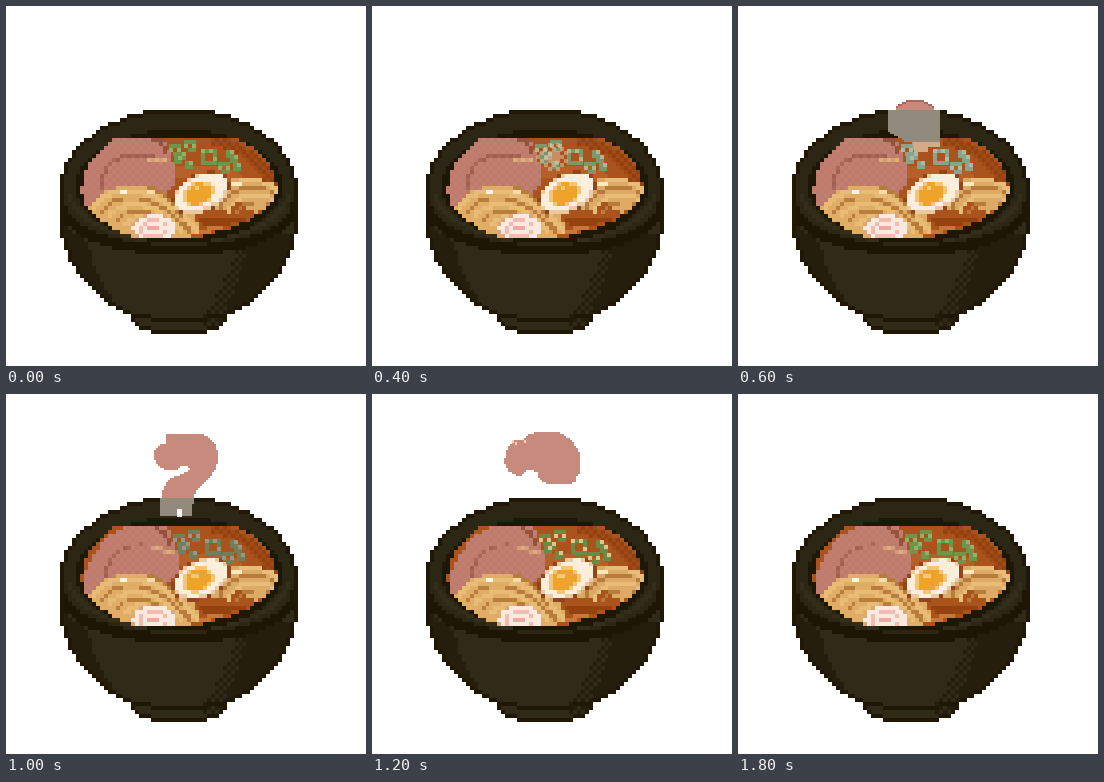
Animation, 360 px wide and 360 px high, one loop 2 s. Source, as an HTML page with a canvas:

```html
<!DOCTYPE html>
<html lang="en">
<head>
<meta charset="utf-8">
<title>Ramen</title>
<style>
html, body { margin: 0; width: 100%; height: 100%; overflow: hidden; background: #fff; }
canvas { display: block; width: 360px; height: 360px; }
</style>
</head>
<body>
<canvas id="stage" width="360" height="360"></canvas>
<script>
const stage = document.getElementById('stage');
const ctx = stage.getContext('2d');
const COLS = 60, ROWS = 56, LEFT = 54, TOP = 104;
const CW = 238 / COLS, CH = 4;
const STEP = 200, STEPS = 10;

const shape = d => new Path2D(d);
function oval(x, y, rx, ry, turn = 0) {
  const p = new Path2D();
  p.ellipse(x, y, rx, ry, turn, 0, Math.PI * 2);
  return p;
}

const bowl = shape('M147 105H199C244 109 291 143 291 180V222C287 258 262 292 222 309L219 317Q211 327 190 327H156Q135 327 127 317L124 309C84 292 58 258 54 222V180C54 143 102 109 147 105Z');
const wall = oval(173, 180, 103, 57);
const broth = shape('M110 132H229Q270 150 271 184Q266 214 191 231H127Q77 212 75 184Q80 148 110 132Z');
const rimEdge = shape('M54 198C62 229 112 244 173 244S284 229 291 198');
const rimLight = shape('M63 188C70 218 120 236 173 236S276 218 283 188');
const rim = shape('M54 104H291V196C284 228 233 244 173 244S62 228 54 196Z');
const shade = shape('M242 230H300V327H205Q236 282 242 230ZM50 215L82 236Q86 265 108 296L100 310H50Z');
const shadeSoft = shape('M232 236H250L220 318H192Q220 280 232 236Z');
const foot = shape('M123 307Q173 322 223 307');

// Each layer: path, tone, checker tone, stroke width, shift for the second pose.
const layers = [];
const add = (p, c, alt = c, w = 0, shift = [0, 0]) => layers.push({ p, c, alt, w, shift });

add(broth, '#ab531c');
add(shape('M205 128Q258 140 275 180L258 174Q246 148 205 139Z'), '#93420f', '#a04a17');
add(shape('M166 160H216L240 169L226 176L164 172Z'), '#b65f28');
add(shape('M194 212H246L226 218H196Z'), '#94430f');
add(shape('M192 226L216 221'), '#c8763a', undefined, 5);

const slip = [4, 3];
add(shape('M66 200L78 168Q92 137 120 128H154Q163 138 165 151Q173 164 170 176L158 188H120L98 199Z'), '#be7b6c', '#c17f71', 0, slip);
add(shape('M96 186Q97 158 119 151Q143 145 163 155Q171 166 169 175L158 186L119 187Z'), '#c28072', '#bd7969', 0, slip);
add(shape('M94 188Q94 161 113 152Q130 145 152 152'), '#a0604f', '#a86858', 3, slip);
add(shape('M142 153L152 152L163 157'), '#dfad78', '#d39d77', 4, slip);
add(shape('M145 131L155 136L160 147'), '#97513c', undefined, 4, slip);

// Noodle bundles
add(shape('M203 205Q207 174 233 172Q255 171 272 183L267 202L248 207L232 196L214 206Z'), '#dcaa64');
for (let k = 0; k < 4; k++) {
  const d = `M${204 + k * 9} ${204 + k}Q${211 + k * 8} ${177 + k * 7} ${238 + k * 4} ${175 + k * 7}T272 ${187 + k * 6}`;
  add(shape(d), k % 2 ? '#b77c3b' : '#e8bd79', undefined, k % 2 ? 3 : 4);
}
add(shape('M226 177H237'), '#fbe9c2', undefined, 4);

add(shape('M82 203Q94 181 119 181Q151 178 169 195Q188 205 194 222L183 234H118Z'), '#dfad66');
for (let k = 0; k < 5; k++) {
  const d = `M${86 + k * 8} ${204 + k * 4}C${99 + k * 7} ${178 + k * 8} ${149 - k} ${173 + k * 8} ${191 - k * 7} ${226 + k}`;
  add(shape(d), k % 2 ? '#b97e3d' : '#e8bc76', undefined, k % 2 ? 3 : 5);
}
add(shape('M143 182Q164 188 172 205L184 227'), '#b77b3a', undefined, 3);
add(shape('M113 185H123'), '#fff5dd', undefined, 4);
add(shape('M140 186H149'), '#f5dcac', undefined, 4);

const tilt = -0.45, lift = [0, -2];
add(oval(195, 187, 30, 19, tilt), '#92441a', undefined, 0, lift);
add(oval(195, 187, 29, 18, tilt), '#ecc9a0', undefined, 0, lift);
add(oval(195, 186, 27, 16, tilt), '#fbeedb', undefined, 0, lift);
add(oval(192, 188, 16, 12, tilt), '#f3c579', undefined, 0, lift);
add(oval(192, 188, 13, 10, tilt), '#eea32b', undefined, 0, lift);
add(shape('M185 185L194 181'), '#f8c86c', undefined, 3, lift);

const bob = [0, 3];
add(oval(148, 222, 23, 14), '#d9a67f', undefined, 0, bob);
add(oval(148, 222, 21, 13), '#fae9de', undefined, 0, bob);
add(oval(148, 223, 13, 8), '#f2bcb2', undefined, 3, bob);
add(shape('M143 223H152'), '#eca9a1', undefined, 3, bob);
layers.reverse();

const inside = (p, x, y) => ctx.isPointInPath(p, x, y);
function onLine(p, w, x, y) {
  ctx.lineWidth = w;
  return ctx.isPointInStroke(p, x, y);
}

function tone(x, y, odd, pose) {
  if (inside(broth, x, y)) {
    for (const { p, c, alt, w, shift } of layers) {
      const u = x - shift[0] * pose, v = y - shift[1] * pose;
      if (w ? onLine(p, w, u, v) : inside(p, u, v)) return odd ? alt : c;
    }
  }
  const edge = [[CW, 0], [-CW, 0], [0, CH], [0, -CH]].some(([a, b]) => !inside(bowl, x + a, y + b));
  if (edge) return '#211705';
  if (inside(wall, x, y)) return '#1d1706';
  if (onLine(rimEdge, 10, x, y)) return '#1d1605';
  if (onLine(rimLight, 4, x, y)) return '#332d1b';
  if (inside(rim, x, y)) return '#2c2614';
  if (onLine(foot, 4, x, y)) return '#1f1706';
  if (inside(shade, x, y)) return '#251e0d';
  if (inside(shadeSoft, x, y)) return odd ? '#251e0d' : '#302a18';
  return '#302a18';
}

function scene(pose) {
  const c = document.createElement('canvas');
  c.width = c.height = 360;
  const g = c.getContext('2d');
  for (let r = 0; r < ROWS; r++) for (let i = 0; i < COLS; i++) {
    const x = LEFT + (i + .5) * CW, y = TOP + (r + .5) * CH;
    if (!inside(bowl, x, y)) continue;
    const x0 = Math.round(LEFT + i * CW), x1 = Math.round(LEFT + (i + 1) * CW);
    g.fillStyle = tone(x, y, (i + r) & 1, pose);
    g.fillRect(x0, TOP + r * CH, x1 - x0, CH);
  }
  return c;
}
const poses = [scene(0), scene(1)];

// Spring onion: x, y and size in cells
const onions = [[163, 138, 3], [178, 134, 3], [172, 146, 2], [168, 150, 2], [179, 155, 2], [195, 143, 4], [220, 144, 2], [224, 149, 2], [212, 156, 3], [227, 157, 2]];
function drawOnions(pose, [main, light]) {
  for (const [x, y, n] of onions) for (let r = 0; r < n; r++) for (let c = 0; c < n; c++) {
    const hole = n > 2 && r > 0 && c > 0 && r < n - 1 && c < n - 1;
    if (hole || (n === 3 && r === 2 && c === 0)) continue;
    ctx.fillStyle = (r + c * 2 + n) % 4 ? main : light;
    ctx.fillRect(x + c * 4 + pose * 4, y + r * 4 + pose * 2, 4, 4);
  }
}

const GREEN = ['#6f954b', '#8fb16a'];
const PINK = '#c88a7d', GREY = '#938a7e';
const puffs = {
  3: {
    d: 'M151 104H157Q160 96 172 94H181Q193 96 197 104H202V136H168L160 131L151 126Z',
    low: 'M174 136H202V141H190V146H176Z', rimmed: true
  },
  4: {
    d: 'M151 104Q151 95 158 88Q164 80 162 70L158 66L159 58L168 55L172 51Q181 49 188 54H194Q209 59 209 72V88Q208 95 194 102Q186 108 189 118L193 131H171Q163 129 161 119L151 113Z',
    low: 'M170 131H191V137H188V145H176V138H170Z'
  },
  5: {
    d: 'M160 40H196Q211 46 212 61Q212 76 201 86Q190 95 188 104V110H185V122H155V105Q157 92 165 84Q179 80 184 75Q180 70 174 73Q170 78 158 75Q147 69 148 59Q151 51 160 49Z',
    low: 'M171 115H176V123H171Z', spot: '#f8f6f2'
  },
  6: {
    d: 'M133 64Q135 50 143 46L150 47L157 41Q166 37 178 37Q191 38 198 46Q207 54 209 66Q209 75 207 80L203 83V88L198 90H180Q167 89 166 80Q162 75 154 77L148 82Q135 80 133 70Z'
  }
};
for (const p of Object.values(puffs)) {
  p.path = shape(p.d);
  p.lowPath = p.low && shape(p.low);
}

function drawSteam(n) {
  if (n === 2) {
    ctx.fillStyle = 'rgba(226,190,160,.55)';
    for (let y = 137; y < 163; y += 4) for (let x = 160; x < 196; x += 4) {
      const d = Math.hypot((x - 179) / 17, (y - 149) / 13);
      if (d < 1 && (d < .5 || (x + y) % 8 < 4)) ctx.fillRect(x, y, 4, 4);
    }
    return;
  }
  const puff = puffs[n];
  if (!puff) return;
  for (let y = 36; y < 138; y += 2) for (let x = 130; x < 216; x += 2) {
    if (!inside(puff.path, x + 1, y + 1)) continue;
    const brink = puff.rimmed && y < 104 && !inside(puff.path, x + 1, y - 1);
    ctx.fillStyle = brink ? '#ad6757' : y < 104 ? PINK : GREY;
    ctx.fillRect(x, y, 2, 2);
  }
  if (puff.lowPath) {
    ctx.fillStyle = puff.spot || '#d6a988';
    ctx.fill(puff.lowPath);
  }
  if (n === 6) {
    ctx.fillStyle = '#f0d8b0';
    for (const [x, y] of [[140, 46], [143, 48], [152, 46]]) ctx.fillRect(x, y, 2, 3);
  }
}

const tints = {
  2: ['#7c986a', '#adb892'],
  3: ['#8aa38c', '#a5bcab'],
  4: ['#7d9d68', '#9cb689'],
  5: ['#727f58', '#989687'],
  6: ['#6a8a45', '#e0c58b']
};

let last = -1;
function draw(now) {
  const n = Math.floor(now / STEP) % STEPS;
  if (n === last) return;
  last = n;
  const pose = n < 5 ? 0 : 1;
  ctx.fillStyle = '#fff';
  ctx.fillRect(0, 0, 360, 360);
  ctx.drawImage(poses[pose], 0, 0);
  drawOnions(pose, tints[n] || GREEN);
  drawSteam(n);
}

const start = performance.now();
function tick() {
  draw(performance.now() - start);
  requestAnimationFrame(tick);
}
tick();
</script>
</body>
</html>
```
